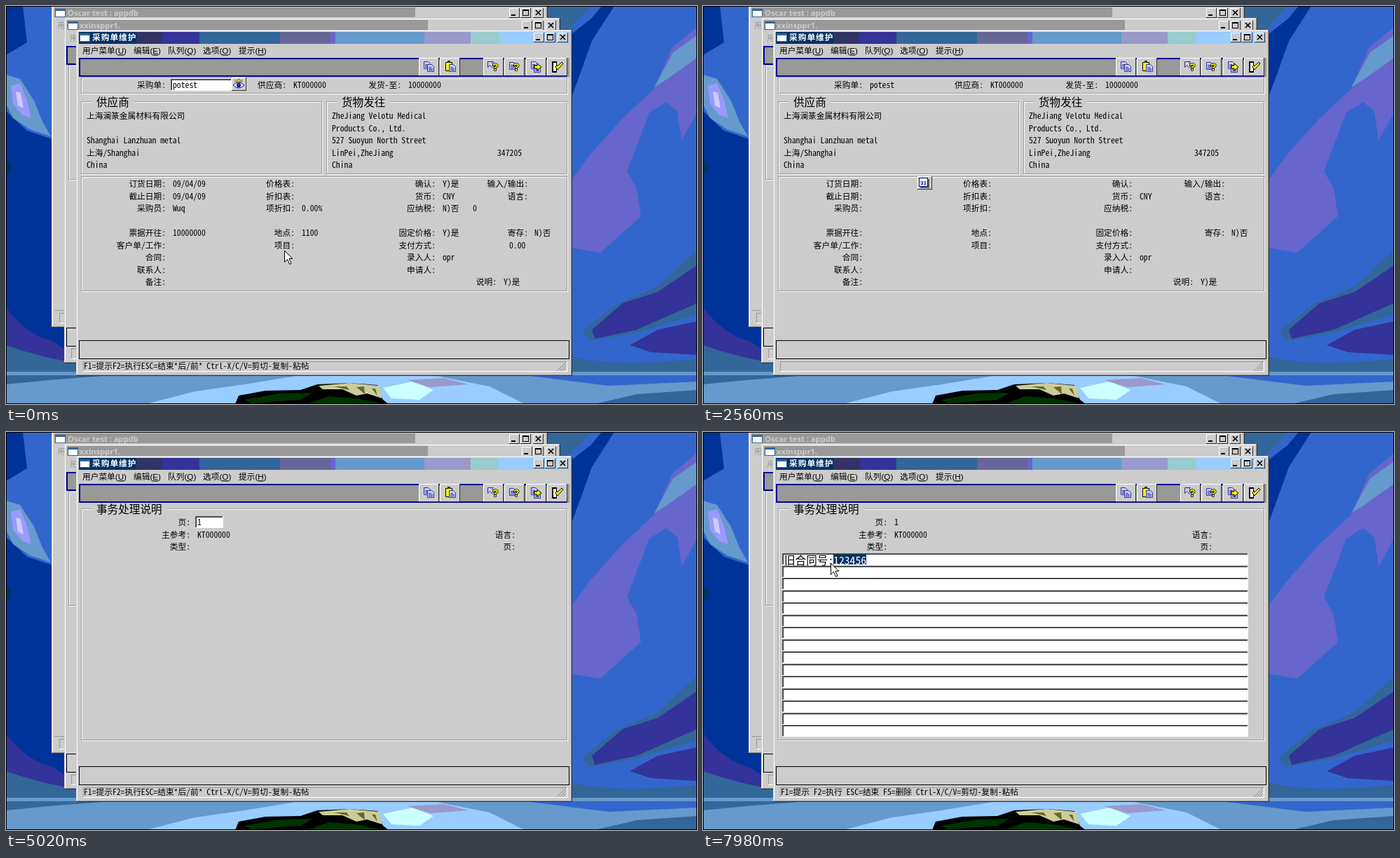
Recreate the animation shown at these times as an HTML page. Size 986 by 568 pixels, loop 8000 ms.

```html
<!DOCTYPE html>
<html lang="zh">
<head>
<meta charset="utf-8">
<style>
html, body { margin: 0; width: 100%; height: 100%; overflow: hidden; background: #36c }
svg { display: block; width: 986px; height: 568px }
text { font: 11.7px "Noto Sans Mono CJK SC", "Noto Sans CJK SC", monospace; white-space: pre }
.big { font-size: 15.6px }
.menu { font-family: "Liberation Sans", "Noto Sans CJK SC", sans-serif }
.title { font: bold 11.2px "Open Sans", "Noto Sans CJK SC", sans-serif }
.cjk { font: bold 11.7px "Noto Sans CJK SC", sans-serif; letter-spacing: 1px }
.mark { font: bold 14px "Liberation Sans", sans-serif; stroke: #000; stroke-width: 1.6px; paint-order: stroke }
.tiny { font: bold 8px "Liberation Sans", sans-serif }
.u { text-decoration: underline }
</style>
</head>
<body>
<svg viewBox="0 0 986 568"><g id="back"></g><g id="live"></g><rect x=".5" y=".5" width="985" height="567" fill="none" stroke="#000"/></svg>
<script>
const LOOP = 8000;
const rect = (x, y, w, h, fill) =>
  `<rect x="${x}" y="${y}" width="${w}" height="${h}" fill="${fill}" shape-rendering="crispEdges"/>`;
const path = (d, fill, stroke = 'none', width = 1) =>
  `<path d="${d}" fill="${fill}" stroke="${stroke}" stroke-width="${width}"/>`;
// y is the middle of the line
const text = (x, y, s, cls = '', fill = '#000', anchor = 'start') =>
  `<text x="${x}" y="${y + (cls === 'big' ? 5.6 : 4.3)}" class="${cls}" fill="${fill}" text-anchor="${anchor}">${s}</text>`;
const label = (x, y, s) => text(x, y, s + ':', '', '#000', 'end');
const bevel = (x, y, w, h, light = '#fff', dark = '#666', fill = '#ccc') =>
  rect(x, y, w, h, dark) + rect(x, y, w - 1, h - 1, light) + rect(x + 1, y + 1, w - 2, h - 2, fill);
const etched = (x, y, w, h) => [[1.5, '#fff'], [.5, '#999']].map(([d, c]) =>
  `<rect x="${x + d}" y="${y + d}" width="${w - 2}" height="${h - 2}" fill="none" stroke="${c}"/>`).join('');
const group = (x, y, w, h, title) => etched(x, y, w, h) +
  rect(x + 15, y - 2, title.length * 15.6 + 14, 6, '#ccc') + text(x + 22, y + 1, title, 'big');
const field = (x, y, w, fill = '#fff') => bevel(x, y - 9, w, 17, '#666', '#fff', '#333') +
  rect(x + 2, y - 7, w - 3, 14, fill);

function wallpaper() {
  return rect(0, 0, 986, 568, '#36c') + rect(0, 0, 110, 530, '#039') + [
    // left
    ['M24 0H66V190L30 178 0 150V70L30 52Z', '#36c'],
    ['M0 98L20 104 40 135 52 165 64 186 34 176 10 160 0 140Z', '#69c'],
    ['M7 114L20 110 30 134 36 160 24 156 10 140Z', '#99f'],
    ['M14 122L21 124 25 146 17 142Z', '#ccf'],
    ['M0 218L8 226 6 238 0 242Z', '#036'],
    ['M0 430Q30 470 66 478L100 500V530H0Z', '#339'],
    ['M0 484Q50 502 104 510V530H0Z', '#369'],
    // right
    ['M772 0H836L820 16 800 36H772Z', '#369'],
    ['M807 40L835 18 850 0H868L836 50 818 100 807 130Z', '#039'],
    ['M986 30L950 60 925 118 880 160 832 214 807 248V345L848 352 906 300 900 260 886 236 918 152 942 137 958 150 964 192 986 152Z', '#66c'],
    ['M986 42L952 66 925 116 944 104 986 74Z', '#69c'],
    ['M986 348L930 400 870 426 822 464 832 478 900 466 986 440Z', '#369'],
    ['M986 370L930 408 880 424 836 462 840 475 900 462 986 424Z', '#339'],
    ['M890 484L930 462 986 450V498L920 494Z', '#339'],
    ['M807 500Q860 516 986 504V530H807Z', '#369'],
    // horizon
    ['M0 522H986V568H0Z', '#69c'],
    ['M0 527H150L60 534 0 540Z', '#369'],
    ['M200 568L270 550 340 540 420 527H610L690 543 740 568Z', '#9cf'],
    ['M538 545L580 536 610 548 590 562 550 560Z', '#cff'],
    ['M572 534L625 531 660 540 606 544Z', '#99c'],
    ['M740 527H986V536L860 542Z', '#36c'],
    ['M840 568L900 554 986 548V568Z', '#369'],
    ['M327 568L332 556 370 549 420 548 444 540 490 538 530 541 538 562 546 568Z', '#000'],
    ['M340 562L390 553 438 552 420 562 350 567Z', '#030'],
    ['M446 542L490 538 532 542 537 560 515 553 500 556 480 547 452 547Z', '#cc9'],
    ['M468 543L486 543 490 548ZM500 544L511 543 512 554ZM522 546L527 546 530 556Z', '#663'],
    ['M430 568L460 557 500 560 540 568Z', '#030']
  ].map(([d, c]) => path(d, c)).join('');
}

function frameWindow(x, y, h) {
  const buttons = [653, 669, 687].map((d, i) => {
    const bx = x + d, by = y + 4;
    return bevel(bx, by, 15, 14, '#fff', '#333') + [
      rect(bx + 3, by + 9, 6, 2, '#000'),
      rect(bx + 3, by + 2, 9, 9, '#000') + rect(bx + 4, by + 4, 7, 6, '#ccc'),
      path(`M${bx + 4} ${by + 3}l7 7m0 -7l-7 7`, 'none', '#000', 1.6)
    ][i];
  });
  return bevel(x, y, 708, h, '#ccc', '#333') + bevel(x + 1, y + 1, 706, h - 2, '#fff', '#999') +
    titleBar(x, y) + buttons.join('');
}

function titleBar(x, y) {
  const bands = [[4, '#036'], [86, '#336'], [123, '#339'], [176, '#369'], [291, '#669'], [363, '#66c'],
    [370, '#69c'], [497, '#99c'], [563, '#9cc'], [603, '#9cf']];
  const bar = x === 100
    ? bands.map(([d, c]) => rect(x + d, y + 3, 703 - d, 17, c)).join('')
    : rect(x + 4, y + 3, 515, 14, '#999');
  return bar + rect(x + 5, y + 5, 15, 12, '#369') + rect(x + 6, y + 8, 13, 8, '#fff');
}

const page = (x, y) => path(`M${x + .5} ${y + .5}h6l3 3v7h-9z`, '#ccf', '#339') +
  path(`M${x + 2} ${y + 4.5}h4m-4 2h6m-6 2h6`, 'none', '#339');
const question = (x, y) => text(x, y, '?', 'mark', '#ff0');
const arrowRight = (x, y) => path(`M${x} ${y + 3}h4v-3l6 5-6 5v-3h-4z`, '#ff0', '#000');

function toolbar() {
  const icons = [
    [589, x => page(x + 7, 79) + page(x + 12, 83)],
    [619, x => path(`M${x + 8.5} 80.5h9v12h-9z`, '#ff0', '#000') + rect(x + 11, 78, 4, 3, '#333') + page(x + 13, 83)],
    [681, x => path(`M${x + 6.5} 79.5h8l-2 2 4 4-3 3-4-4-3 3z`, '#ccf', '#336') + question(x + 13, 88)],
    [711, x => page(x + 7, 80) + question(x + 13, 88)],
    [742, x => page(x + 7, 79) + page(x + 11, 84) + arrowRight(x + 12, 82)],
    [772, x => rect(x + 7, 79, 7, 16, '#000') + rect(x + 9, 81, 4, 12, '#fff') +
      path(`M${x + 12} 87l3 4 8-9-2-2-6 6-1-2z`, '#ff0', '#000')]
  ];
  return rect(104, 74, 700, 27, '#009') + rect(106, 76, 698, 23, '#999') + rect(801, 74, 3, 27, '#999') +
    icons.map(([x, draw]) => bevel(x, 74, 29, 26, '#fff', '#333') + draw(x)).join('');
}

function desktop() {
  const menus = [[109, '用户菜单', 'U'], [182, '编辑', 'E'], [231, '队列', 'Q'], [281, '选项', 'O'], [332, '提示', 'H']];
  return wallpaper() +
    frameWindow(65, -1, 460) + text(88, 10, 'Oscar test : appdb', 'title', '#ccc') +
    text(73, 28, '用', 'menu', '#999') + rect(69, 434, 14, 1, '#999') + bevel(76, 438, 30, 15, '#999', '#fff') +
    frameWindow(83, 17, 493) + text(105, 28, 'xxinsppr1.', 'title', '#ccc') +
    text(91, 46, '用', 'menu', '#999') + rect(86, 57, 20, 27, '#009') + rect(88, 59, 18, 23, '#999') +
    etched(89, 84, 40, 165) + rect(86, 459, 20, 27, '#000') + rect(87, 460, 20, 25, '#ccc') +
    bevel(93, 489, 30, 15, '#999', '#fff') +
    frameWindow(100, 34, 494) + text(123, 45, '采购单维护', 'cjk', '#fff') +
    menus.map(([x, s, k]) => text(x, 64, `${s}(<tspan class="u">${k}</tspan>)`, 'menu')).join('') + toolbar() +
    rect(104, 477, 700, 27, '#000') + rect(105, 478, 698, 25, '#ccc') +
    bevel(110, 507, 691, 15, '#999', '#fff') +
    path('M786 521l13 -13m-9 13l9 -9m-5 9l5 -5', 'none', '#888');
}

function eye(x, y = 102) {
  const c = x + 10;
  return bevel(x, y, 21, 19, '#fff', '#333') +
    path(`M${c} ${y + 2}l4 4h-8zM${c - 4} ${y + 3}l-2 3M${c + 4} ${y + 3}l2 3`, '#fc0', '#960') +
    path(`M${c - 8} ${y + 11}q8 -8 16 0q-8 8 -16 0z`, '#fff', '#009') +
    `<circle cx="${c}" cy="${y + 11}" r="3" fill="#009"/>` + rect(c - 1, y + 10, 1, 1, '#fff');
}

const calendar = (x, y) => bevel(x, y, 21, 19, '#fff', '#333') + rect(x + 4, y + 4, 13, 13, '#666') +
  rect(x + 2, y + 2, 13, 13, '#009') + rect(x + 3, y + 3, 11, 11, '#fff') + text(x + 4, y + 8, '31', 'tiny', '#009');

const row = k => 254 + 17.5 * k;
const columns = [
  [228, '订货日期 截止日期 采购员 - 票据开往 客户单/工作 合同 联系人 备注'],
  [412, '价格表 折扣表 项折扣 - 地点 项目'],
  [613, '确认 货币 应纳税 - 固定价格 支付方式 录入人 申请人'],
  [745, '输入/输出 语言 - - 寄存']
];
const steady = [[623, 1, 'CNY'], [754, 4, 'N)否'], [623, 6, 'opr'], [710, 8, 'Y)是']];
const editable = [[238, 0, '09/04/09'], [238, 1, '09/04/09'], [238, 2, 'Wuq'], [238, 4, '10000000'],
  [422, 2, '0.00%'], [422, 4, '1100'], [623, 0, 'Y)是'], [623, 2, 'N)否'], [666, 2, '0'],
  [623, 4, 'Y)是'], [718, 5, '0.00']];
const inputs = [[235, 71, '01245678'], [419, 71, '01245'], [620, 35, '0245'], [751, 49, '01']];
const keys = 'F1=提示F2=执行ESC=结束*后/前* Ctrl-X/C/V=剪切-复制-粘帖';
const noteKeys = 'F1=提示 F2=执行 ESC=结束 F5=删除 Ctrl-X/C/V=剪切-复制-粘帖';
const status = s => text(111, 514, s);

function order(t) {
  const during = (a, b, s) => t >= a && t < b ? s : '';
  const put = list => list.map(([x, k, s]) => text(x, row(k), s)).join('');
  const lines = (x, list) => list.map((s, i) => text(x, 157 + 17.5 * i, s)).join('');
  let s = etched(107, 102, 695, 24) +
    during(0, 840, field(235, 113, 87)) + during(0, 1600, eye(322)) +
    during(1600, 1710, field(407, 113, 87) + eye(494)) +
    during(1710, 2030, field(571, 113, 87)) + during(2030, 2350, eye(659)) +
    label(228, 113, '采购单') + text(238, 113, 'potest') +
    label(400, 113, '供应商') + text(410, 113, 'KT000000') +
    label(564, 113, '发货-至') + text(574, 113, '10000000') +
    group(107, 136, 345, 105, '供应商') + group(457, 136, 345, 105, '货物发往') +
    lines(115, ['上海澜篆金属材料有限公司', '', 'Shanghai Lanzhuan metal', '上海/Shanghai', 'China']) +
    lines(465, ['ZheJiang Velotu Medical', 'Products Co., Ltd.', '527 Suoyun North Street', 'LinPei,ZheJiang', 'China']) +
    text(701, 209.5, '347205') + etched(107, 243, 695, 165);
  for (const [x, names] of columns)
    names.split(' ').forEach((n, k) => { if (n !== '-') s += label(x, row(k), n); });
  s += label(700, row(8), '说明');
  if (t >= 2350 && t < 2560)
    for (const [x, w, rows] of inputs) for (const k of rows) s += field(x, row(+k), w);
  s += put(steady) + during(2350, 2880, calendar(306, 243));
  if (t < 2560 || t >= 2880) s += put(editable) + during(840, 4490, text(238, row(5), 'mc'));
  s += during(2880, 4490, rect(281, 196, 346, 150, '#ccc') + etched(281, 196, 346, 150));
  if (t >= 3090) s += field(498, 209, 87) + (t < 3410 || t >= 3950 ? rect(501, 202, 1, 12, '#000') : '');
  return s + (t < 840 || t >= 3090 ? status(keys) : '');
}

function notes(t) {
  let s = group(107, 109, 695, 332, '事务处理说明') +
    (t >= 5020 && t < 5560 ? field(270, 129, 40) + status(keys) : '') +
    label(263, 129, '页') + text(273, 129, '1') +
    label(263, 146.5, '主参考') + text(273, 146.5, 'KT000000') + label(263, 164, '类型') +
    label(727, 146.5, '语言') + label(727, 164, '页');
  if (t < 5560) return s;
  const count = t < 5880 ? 10 : 15;
  for (let i = 0; i < count; i++)
    s += field(113, Math.round(182 + 17.5 * i), 665, count === 10 && i === 9 ? '#ccc' : '#fff');
  const digits = '123456', end = 233, step = 7.8;
  const picked = t < 7360 ? 0 : Math.max(0, Math.min(6, Math.round((end - pointer(t)[0]) / step)));
  const cut = 6 - picked, x = end - picked * step;
  s += text(116, 183, '旧合同号:' + digits.slice(0, cut), 'big');
  if (picked) s += rect(x, 175, end - x, 14, '#036') + text(x, 183, digits.slice(cut), 'big', '#fff');
  return s + (t >= 5990 ? status(noteKeys) : '');
}

const track = [[0, 397, 349], [100, 417, 352], [420, 500, 357], [525, 640, 364], [630, 800, 370], [735, 928, 374],
  [840], [6530, 961, 372], [6633, 760, 330], [6737, 470, 280], [6840, 272, 245], [6943, 262, 225],
  [7047, 258, 205], [7150, 256, 192], [7250, 255, 189]];

function pointer(t) {
  if (t >= 7360) { // drag to the left in seven steps
    const k = Math.min(7, 1 + Math.floor((t - 7360 + 1) / 103.3)) / 7;
    return [Math.round(255 - 73 * k), Math.round(189 - 2 * k)];
  }
  return track.filter(p => p[0] <= t).pop().slice(1);
}

function scene(t) {
  const [x, y] = pointer(t);
  return (t < 4490 ? order(t) : t < 4920 ? '' : notes(t)) +
    (x ? path(`M${x + .5} ${y + .5}v16l4 -4 3 7 2.5 -1 -3 -7h5z`, '#fff', '#000') : '');
}

const live = document.getElementById('live');
document.getElementById('back').innerHTML = desktop();
let shown;
function tick() {
  const next = scene(performance.now() % LOOP);
  if (next !== shown) live.innerHTML = shown = next;
  requestAnimationFrame(tick);
}
tick();
</script>
</body>
</html>
```
